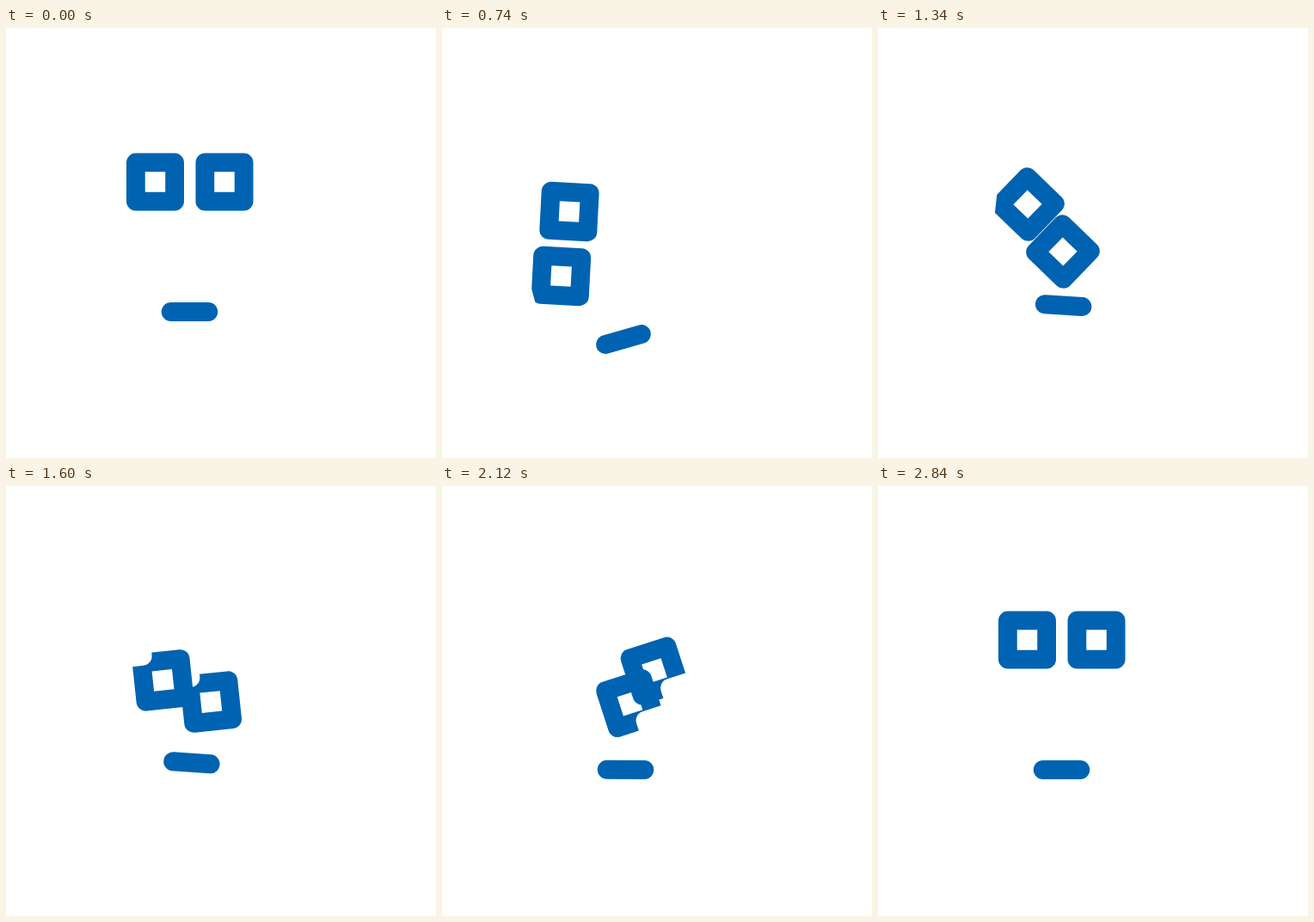
An HTML page with a canvas that plays this animation: 500x500 px, repeating every 3020 ms.

```html
<!DOCTYPE html>
<html lang="en">
<head>
<meta charset="utf-8">
<title>Rolling eyes</title>
<style>
html, body { margin: 0; width: 100%; height: 100%; overflow: hidden; background: #fff; }
canvas { display: block; }
</style>
</head>
<body>
<canvas id="stage" width="500" height="500"></canvas>
<script>
const LOOP = 3020, STEP = 20, BLUE = '#0063b1';
const HALF = 33.5, HOLE = 11.75, ROUND = 11;
const ctx = document.getElementById('stage').getContext('2d');

// Key poses: time, first eye x y, second eye x y, eye turn in degrees, mouth swing.
const POSES = [
  [180, 173.5, 179, 254, 179, 0, 0],
  [340, 154, 210.5, 222, 195, -2, 0.51],
  [740, 138.5, 288.5, 148, 213.5, 3, 1],
  [1340, 215, 260, 174, 205, 44, -0.23],
  [1800, 249, 242.5, 191, 241.6, 127, -0.18],
  [2480, 221.5, 186, 247.5, 238, 370, 0.14],
  [2840, 173.5, 179, 254, 179, 360, 0]
];

const clamp = (v, lo, hi) => Math.min(hi, Math.max(lo, v));
const rad = deg => deg * Math.PI / 180;

// Rate of change of column c at pose i, weighted by the spacing of its neighbours.
function rate(i, c) {
  const slope = k => (POSES[k + 1][c] - POSES[k][c]) / (POSES[k + 1][0] - POSES[k][0]);
  if (i === 0) return slope(0);
  if (i === POSES.length - 1) return slope(i - 1);
  const before = POSES[i][0] - POSES[i - 1][0], after = POSES[i + 1][0] - POSES[i][0];
  return (slope(i - 1) * after + slope(i) * before) / (before + after);
}

// Hermite curve through the key poses.
function poseAt(time) {
  const t = clamp(time, POSES[0][0], POSES.at(-1)[0]);
  let i = 0;
  while (i < POSES.length - 2 && t >= POSES[i + 1][0]) i++;
  const a = POSES[i], b = POSES[i + 1], d = b[0] - a[0];
  const u = (t - a[0]) / d, w = 1 - u;
  return a.map((v, c) => v * w * w * (1 + 2 * u) + b[c] * u * u * (3 - 2 * u)
    + d * u * w * (rate(i, c) * w - rate(i + 1, c) * u));
}

// Keeps everything except a piece at the lower left corner.
function clipCorner(w, h, r) {
  const far = HALF + 5;
  ctx.beginPath();
  ctx.rect(-60, -60, 120, 120);
  ctx.moveTo(-far, HALF - h);
  ctx.lineTo(-HALF, HALF - h);
  if (r) ctx.arcTo(w - HALF, HALF - h, w - HALF, HALF, r);
  ctx.lineTo(w - HALF, HALF);
  ctx.lineTo(w - HALF, far);
  ctx.lineTo(-far, far);
  ctx.closePath();
  ctx.clip('evenodd');
}

function drawEye(x, y, turn, notch, bevel) {
  ctx.save();
  ctx.translate(x, y);
  ctx.rotate(rad(turn));
  if (notch > 0) clipCorner(20 * notch, HALF * notch, Math.min(ROUND, 20 * notch));
  else if (bevel > 0) clipCorner(bevel, HALF / 2, 0);
  ctx.beginPath();
  ctx.roundRect(-HALF, -HALF, 2 * HALF, 2 * HALF, ROUND);
  ctx.rect(-HOLE, -HOLE, 2 * HOLE, 2 * HOLE);
  ctx.fill('evenodd');
  ctx.restore();
}

function drawMouth(q) {
  ctx.save();
  ctx.translate(213.5 - 8 * q + 5.5 * q * q, 330 + 32 * q);
  ctx.rotate(rad(-16 * q));
  ctx.beginPath();
  ctx.roundRect(-32.75, -11, 65.5, 22, 11);
  ctx.fill();
  ctx.restore();
}

function draw(t) {
  const [, x1, y1, x2, y2, turn, swing] = poseAt(t);
  const notch = clamp(Math.min((t - 1360) / 340, (2800 - t) / 240), 0, 1);
  const bevel = (t - 300) / 80; // worn by the eye further left
  ctx.fillStyle = '#fff';
  ctx.fillRect(0, 0, 500, 500);
  ctx.fillStyle = BLUE;
  drawEye(x1, y1, turn, notch, t < 1360 && x1 < x2 ? bevel : 0);
  drawEye(x2, y2, turn, notch, t < 1360 && x2 < x1 ? bevel : 0);
  drawMouth(swing);
}

const start = performance.now();
function tick() {
  const t = (performance.now() - start) % LOOP;
  draw(Math.floor(t / STEP) * STEP);
  requestAnimationFrame(tick);
}
tick();
</script>
</body>
</html>
```
